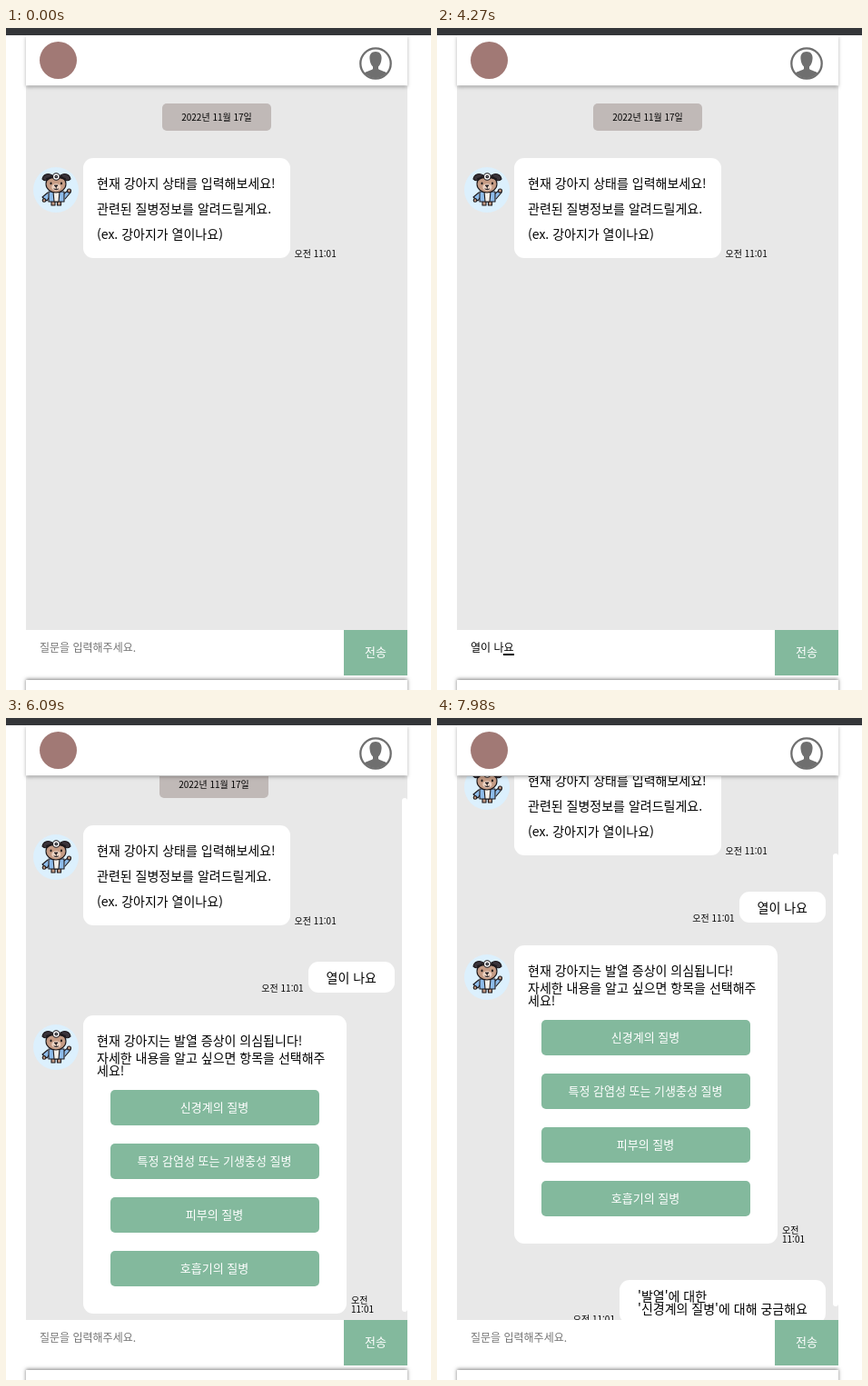
Recreate the animation shown at these times as an HTML page. Size 468 by 728 pixels, loop 8000 ms.

```html
<!DOCTYPE html>
<html lang="ko">
<head>
<meta charset="utf-8">
<title>반려견 상담 채팅</title>
<style>
* { box-sizing: border-box; }
html, body { margin: 0; width: 100%; height: 100%; overflow: hidden; background: #fff; }
body { font: 500 14px/14px "Noto Sans CJK KR", "Noto Sans KR", "Noto Sans CJK", sans-serif; color: #000; }
div, svg { position: absolute; }
#stage { width: 468px; height: 728px; overflow: hidden; white-space: nowrap; }
.top { left: 0; top: 0; width: 468px; height: 8px; background: #343639; }
.header, .footer { left: 22px; width: 420px; background: #fff; }
.header { top: 8px; height: 55px; box-shadow: 0 2px 4px rgba(0, 0, 0, .3); }
.footer { top: 717px; height: 30px; box-shadow: 0 -1px 4px rgba(0, 0, 0, .5); }
.logo { left: 15px; top: 7px; width: 41px; height: 41px; border-radius: 50%; background: #a17975; }
.user-icon { left: 366px; top: 12px; }

#chat { left: 22px; top: 64px; width: 420px; height: 598px; background: #e8e8e8; overflow: hidden; }
#log { left: 0; top: 0; width: 420px; height: 720px; }
#log.narrow { width: 414px; }
.date { left: calc(50% - 60px); top: 19px; width: 120px; height: 30px; border-radius: 5px;
  background: #c0b9b7; font-size: 10px; line-height: 30px; text-align: center; }
.row { display: flex; align-items: flex-end; gap: 5px; }
.bot { left: 63px; }
.me { right: 8px; }
.row > div { position: relative; }
.bubble { background: #fff; border-radius: 11px; }
.me .bubble { padding: 10px 20px; }
.time { font-weight: 400; font-size: 10px; line-height: 10px; }
.intro { width: 227.5px; height: 110px; padding: 13px 15px; line-height: 28px; }
.answer { width: 290px; height: 328px; padding: 20px 15px; }
.answer p { margin: 0 0 5px; }
.choice { left: 29.5px; width: 230px; height: 39px; border-radius: 5px; background: #83b99d;
  color: #fff; font-size: 13px; line-height: 38px; text-align: center; }
.avatar { left: 8px; }
#thumb { left: 414px; width: 6px; border-radius: 3px; background: #fff; }

.bar { left: 22px; top: 662px; width: 420px; height: 50px; background: #fff; }
#field { left: 15px; top: 9px; height: 20px; font-size: 12px; line-height: 20px; white-space: pre; }
#hint { color: #757575; }
#compose { display: inline-block; position: relative; }
#compose:not(:empty)::after { content: ""; position: absolute; left: 0; right: 0; top: 17px; height: 1.5px; background: #000; }
#caret { display: inline-block; width: 1px; height: 17px; margin-right: -1px; vertical-align: -4px; background: #000; }
.send { left: 350px; top: 0; width: 70px; height: 50px; background: #83b99d; color: #fff;
  font-size: 13px; line-height: 48px; text-align: center; }
[hidden] { display: none !important; }
</style>
</head>
<body>
<svg width="0" height="0">
  <symbol id="doctor" viewBox="0 0 50 50">
    <circle cx="25" cy="25" r="25" fill="#dcf0fd"/>
    <g stroke="#1d191c" stroke-width="1.1" stroke-linejoin="round" stroke-linecap="round">
      <path d="M20 36v6h4v-5h2.500v5h4v-6z" fill="#c59c85"/>
      <path d="M16 28l-6 5 5 4 2-3M34 29l4-3 3 2-6 7" fill="#8dbbe9"/>
      <path d="M17 27h17v11H17z" fill="#8dbbe9"/>
      <path d="M22 27h7l-1 11h-5z" fill="#f2eee8"/>
      <circle cx="39.500" cy="26" r="2" fill="#c59c85"/>
      <circle cx="12" cy="36.500" r="1.800" fill="#c59c85"/>
      <ellipse cx="25" cy="18.500" rx="11" ry="9.500" fill="#c59c85"/>
      <path d="M21 9C16 6 11 8 10 13q3 3 6 1zM30 9c5-3 10-1 11 4q-3 3-6 1z" fill="#39333a"/>
      <path d="M15 13q10-4 20 0" fill="none" stroke-width="2"/>
      <circle cx="25.300" cy="10.500" r="3.800" fill="#fff"/>
      <circle cx="25.300" cy="10.500" r="1.300" fill="#8f9aa5"/>
      <ellipse cx="25.300" cy="22" rx="5" ry="3.800" fill="#ecd3c3" stroke="none"/>
      <path d="M23.500 20h3.600l-1.800 1.800zM25.300 22v1.500M22.800 24q2.500 1.600 5 0" fill="#1d191c" stroke-width=".8"/>
      <path d="M19.500 17.500v.8M31 17.500v.8" stroke-width="2"/>
    </g>
  </symbol>
</svg>
<div id="stage">
  <div id="chat">
    <div id="log">
      <div class="date">2022년 11월 17일</div>
      <svg class="avatar" style="top:89px" width="50" height="50"><use href="#doctor"/></svg>
      <div class="row bot" style="top:79px">
        <div class="bubble intro">현재 강아지 상태를 입력해보세요!<br>관련된 질병정보를 알려드릴게요.<br>(ex. 강아지가 열이나요)</div>
        <div class="time">오전 11:01</div>
      </div>
      <div class="row me" id="ask" style="top:229px">
        <div class="time">오전 11:01</div>
        <div class="bubble">열이 나요</div>
      </div>
      <div id="reply" style="left:0;top:288px">
        <svg class="avatar" style="top:10px" width="50" height="50"><use href="#doctor"/></svg>
        <div class="row bot">
          <div class="bubble answer">
            <p>현재 강아지는 발열 증상이 의심됩니다!</p>
            <p>자세한 내용을 알고 싶으면 항목을 선택해주<br>세요!</p>
            <div class="choice" style="top:82px">신경계의 질병</div>
            <div class="choice" style="top:141px">특정 감염성 또는 기생충성 질병</div>
            <div class="choice" style="top:200px">피부의 질병</div>
            <div class="choice" style="top:259px">호흡기의 질병</div>
          </div>
          <div class="time">오전<br>11:01</div>
        </div>
      </div>
      <div class="row me" id="pick" style="top:656px">
        <div class="time">오전 11:01</div>
        <div class="bubble">'발열'에 대한<br>'신경계의 질병'에 대해 궁금해요</div>
      </div>
    </div>
    <div id="thumb"></div>
  </div>
  <div class="bar">
    <div id="field"><span id="typed"></span><span id="compose"></span><span id="caret"></span><span id="hint">질문을 입력해주세요.</span></div>
    <div class="send">전송</div>
  </div>
  <div class="footer"></div>
  <div class="header">
    <div class="logo"></div>
    <svg class="user-icon" width="38" height="38" viewBox="0 0 38 38">
      <clipPath id="disc"><circle cx="19" cy="19" r="16"/></clipPath>
      <path clip-path="url(#disc)" fill="#6f6f6f" d="M19 6c-5 0-7 3.500-6.500 8 .3 4 1.500 6.500 3.500 8.500v2.500c-2 2-8 2.500-11 5.500v6h28v-6c-3-3-9-3.500-11-5.500v-2.500c2-2 3.200-4.500 3.500-8.500C26 9.500 24 6 19 6z"/>
      <circle cx="19" cy="19" r="16.700" fill="none" stroke="#6f6f6f" stroke-width="2.300"/>
    </svg>
  </div>
  <div class="top"></div>
</div>
<script>
const LOOP = 8000, VIEW = 598;
const SEND = 4410, REPLY = 6020, PICK = 7840;
const $ = id => document.getElementById(id);

// [start, committed text, syllable being composed]
const typing = [
  [0, '', ''], [2170, '', 'ㅇ'], [2310, '', '여'], [2590, '', '열'],
  [2800, '열', 'ㅇ'], [2940, '열', '이'], [3080, '열이 ', ''],
  [3290, '열이 ', 'ㄴ'], [3360, '열이 ', '나'], [3500, '열이 ', '낭'],
  [3780, '열이 나', '요'], [SEND, '', '']
];
const caretOn = [[1330, 1820], [2170, 4270], [SEND, 4900], [5460, 6020], [6510, 7000], [7560, 7700]];
const scrolls = [[0, 0], [REPLY, 9], [6090, 25], [6160, 33], [PICK, 37], [7910, 70], [7980, 102]];

const latest = (steps, t) => steps.filter(s => s[0] <= t).pop();

function render(t) {
  const [, typed, compose] = latest(typing, t);
  $('typed').textContent = typed;
  $('compose').textContent = compose;
  $('hint').hidden = !!(typed + compose);
  $('caret').style.opacity = caretOn.some(([a, b]) => t >= a && t < b) ? 1 : 0;

  $('ask').hidden = t < SEND;
  $('reply').hidden = $('thumb').hidden = t < REPLY;
  $('pick').hidden = t < PICK;
  $('log').classList.toggle('narrow', t >= REPLY);

  const y = latest(scrolls, t)[1];
  const ratio = VIEW / (t < PICK ? 632 : 718);
  $('log').style.top = -y + 'px';
  $('thumb').style.top = y * ratio + 'px';
  $('thumb').style.height = VIEW * ratio + 'px';
}

const start = performance.now();
function tick() {
  render((performance.now() - start) % LOOP);
  requestAnimationFrame(tick);
}
tick();
</script>
</body>
</html>
```
